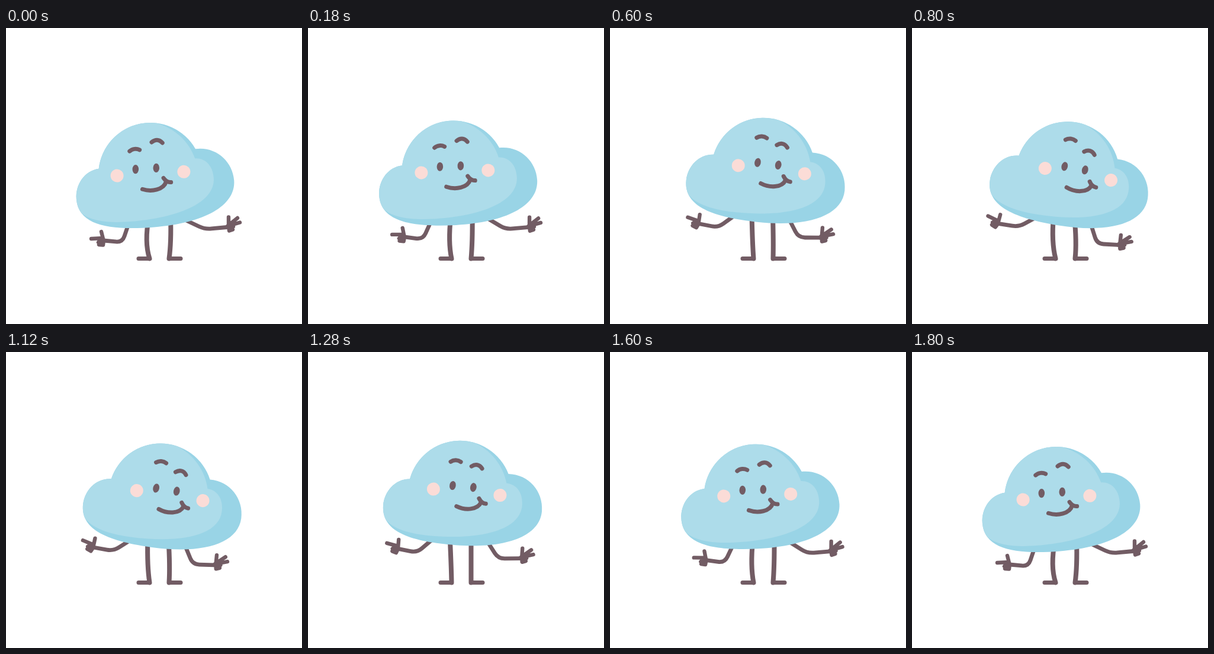
Recreate the animation shown at these times as an HTML page. Size 500x500 px, loop 1840 ms.

```html
<!DOCTYPE html>
<html lang="en">
<head>
<meta charset="utf-8">
<title>Cloud swaying</title>
<style>
  html, body { margin: 0; width: 100%; height: 100%; overflow: hidden; background: #fff; }
  svg { display: block; width: 100%; height: 100%; }
  .line { fill: none; stroke: #725c64; stroke-linecap: round; stroke-linejoin: round; }
  .eye { fill: #725c64; }
  .cheek { fill: #fbdcd7; }
</style>
</head>
<body>
<svg viewBox="0 0 500 500">
  <g class="line" stroke-width="8">
    <path id="legL"/>
    <path id="legR"/>
    <path stroke-width="7" d="M224 389.5H242.5M275.5 389.5H295"/>
  </g>
  <g class="line" stroke-width="6.8">
    <path id="armL"/>
    <path id="armR"/>
  </g>
  <g class="line" stroke-width="6.4">
    <path id="handL" d="M0 0L19 -1M17 -12L20 0L21 3M17 0L12 6L17 5L13 10L20 10.500L21 3"/>
    <path id="handR" d="M0 0L0 13L-3 17M15 1.500L2 12M19 9L2 14M3 13L8 16L2 18L7 21L1 23L0 14"/>
  </g>
  <g id="cloud">
    <path fill="#99d4e6" d="M164.5 222A87.8 87.8 0 0 1 330 201C364 199 391 226 391 259C391 302 335 327.5 250 327.5C178 327.5 123 316 123 270C123 246 140 223.5 164.5 222Z"/>
    <path fill="#addcea" d="M164.5 222A87.8 87.8 0 0 1 268 152.6C297 163 320 187 328 217C344 217 357 230 357 252C357 295 290 315 210 315C185 315 146 312 129.3 293.6C125.2 287 123 279.2 123 270C123 246 140 223.5 164.5 222Z"/>
    <g id="face">
      <circle class="cheek" cx="200" cy="236" r="11"/>
      <circle class="cheek" cx="313" cy="238" r="11"/>
      <ellipse class="eye" rx="5.3" ry="7.6" transform="translate(232 227.5) rotate(5)"/>
      <ellipse class="eye" rx="5.3" ry="7.6" transform="translate(267 228) rotate(5)"/>
      <g class="line" stroke-width="7">
        <path id="browL" d="M225 192C230 188 237 188 242 191"/>
        <path id="browR" d="M262 188.5C268 184 275 184 280 191"/>
        <path d="M241 262C256 268 277 266 282 252M278 246C281 251 285 254 290 254"/>
      </g>
    </g>
  </g>
</svg>
<script>
const SWAY = 1800, LOOP = 1840, STEP = 20;
const part = Object.fromEntries(
  [...document.querySelectorAll("[id]")].map(el => [el.id, el]));
const set = (id, name, value) => part[id].setAttribute(name, value);

// Quadratic path of a coordinate over the sway progress p
const arc = (p, start, a, b = 0) => start + a * p + b * p * p;

// Point at distance d from a towards b
function toward(a, b, d) {
  const k = d / Math.hypot(b[0] - a[0], b[1] - a[1]);
  return [a[0] + (b[0] - a[0]) * k, a[1] + (b[1] - a[1]) * k];
}

// Arm with a rounded elbow
function arm(id, shoulder, elbow, wrist) {
  const upper = toward(elbow, shoulder, 11), lower = toward(elbow, wrist, 11);
  set(id, "d", `M${shoulder}L${upper}Q${elbow} ${lower}L${wrist}`);
}

function place(id, [x, y], angle) {
  set(id, "transform", `translate(${x} ${y}) rotate(${angle})`);
}

// Stage position of a point on a placed part
function local([x, y], angle, [px, py]) {
  const r = angle * Math.PI / 180, c = Math.cos(r), s = Math.sin(r);
  return [x + px * c - py * s, y + px * s + py * c];
}

function pose(p) {
  const drop = arc(p, 9.5, -43.5, 42.3);
  const cloudX = arc(p, 238.5, 29.5, -3.2);
  set("cloud", "transform",
    `translate(${cloudX} ${211 + drop}) rotate(${-4.4 + 14 * p}) translate(-247.5 -211)`);
  set("face", "transform", `translate(${-5.5 + 17.8 * p} 0)`);

  const brow = 4.4 - 14 * p;
  set("browL", "transform", `translate(${-0.15 * brow} ${brow})`);
  set("browR", "transform", `translate(${0.15 * brow} ${-brow})`);

  set("legL", "d", `M242.5 389.5Q${241 - 0.8 * drop} 362 ${241.5 - 2.5 * p} 318`);
  set("legR", "d", `M275.5 389.5Q${276 + 0.35 * drop} 362 ${278 - 4 * p} 318`);

  const tipL = [arc(p, 144, -19.5, 3.6), arc(p, 356, -78, 39.5)], turnL = 30 * p;
  place("handL", tipL, turnL);
  arm("armL",
    [208 + 8 * p, arc(p, 328, -41, 30)],
    [arc(p, 196.5, -26, 9.7), arc(p, 362, -56, 30)],
    local(tipL, turnL, [21, 3]));

  const tipR = [arc(p, 376, -19, -5), arc(p, 319.5, -0.7, 33)], turnR = 6.5 * p;
  place("handR", tipR, turnR);
  arm("armR",
    [298 + 3 * p, arc(p, 322, -40, 47)],
    [arc(p, 336, -21.8, -2.4), arc(p, 340, -4, 30)],
    local(tipR, turnR, [-3, 17]));
}

const start = performance.now();
function draw() {
  const time = (performance.now() - start) % LOOP;
  const t = Math.min(SWAY, Math.floor(time / STEP) * STEP);
  pose((1 - Math.cos(2 * Math.PI * t / SWAY)) / 2);
  requestAnimationFrame(draw);
}
draw();
</script>
</body>
</html>
```
